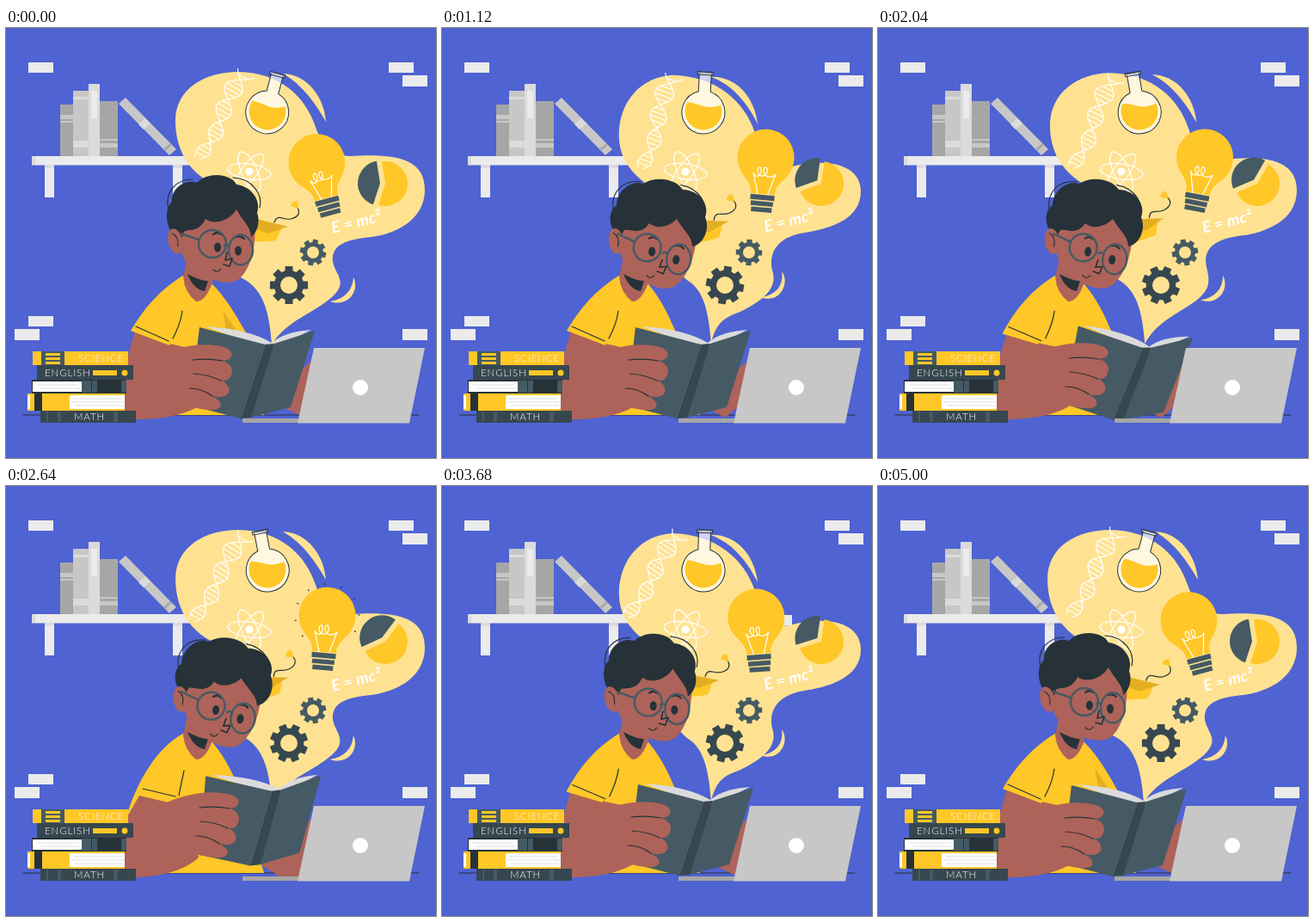
Recreate the animation shown at these times as an HTML page. Size 500x500 px, loop 5080 ms.

```html
<!DOCTYPE html>
<html lang="en">
<head>
<meta charset="utf-8">
<title>Reading and imagining</title>
<style>
html, body { margin: 0; width: 100%; height: 100%; overflow: hidden; background: #4f63d2; }
svg { display: block; width: 100%; height: 100%; }
.dark { fill: #263238; }
.slate { fill: #455a64; }
.deep { fill: #37474f; }
.yel { fill: #ffc727; }
.amber { fill: #e3ae22; }
.cream { fill: #ffe291; }
.skin { fill: #ad6359; }
.pale { fill: #ebebeb; }
.white { fill: #fff; }
.g1 { fill: #a6a6a6; }
.g2 { fill: #c7c7c7; }
.g3 { fill: #dbdbdb; }
.ink, .wire { fill: none; stroke: #263238; stroke-width: 1.2; stroke-linecap: round; stroke-linejoin: round; }
.wire { stroke: #fff; }
.bold { stroke-width: 2.2; }
.frame { fill: none; stroke: #455a64; stroke-width: 2.4; }
text { font: 300 11.5px Lato, sans-serif; letter-spacing: .9px; fill: #fff; }
#formula text { font: italic 700 18.5px Lato, sans-serif; letter-spacing: .2px; }
</style>
</head>
<body>
<svg viewBox="0 0 500 500">
  <defs><clipPath id="bowl"><circle r="21.5"/></clipPath></defs>
  <rect width="500" height="500" fill="#4f63d2"/>

  <path class="pale" d="M26,40h29v12h-29zM445,40h29v12h-29zM461,55h29v13h-29zM26,335h29v12h-29zM10,350h29v13h-29zM461,350h29v13h-29zM378,150h29v12h-29z"/>

  <g id="shelf">
    <path class="pale" d="M30,149h190v10.500h-190zM45,159h11v38h-11zM194,159h11v38h-11z"/>
    <path class="g3" d="M45,159h11v4h-11zM194,159h11v4h-11zM30,149h4v10h-4z"/>
    <path class="g1" d="M63,89h15v60h-15zM109,85h21v64h-21z"/>
    <path class="g2" d="M78,73h18v76h-18zM131,88l8,-7l59,60l-8,7zM63,101h15v5h-15zM63,108h15v2h-15zM109,129h21v2h-21zM109,134h21v5h-21z"/>
    <path class="g3" d="M96,65h13v84h-13zM78,80h18v3h-18zM78,131h18v8h-18zM154,112l8,-7l6,6l-8,7z"/>
    <path class="pale" d="M99,73h7v32h-7z"/>
    <path class="g1" d="M183,141l8,-7l2,2l-8,7z"/>
  </g>

  <g class="cream"><path id="blob"/><path id="arcTop"/><path id="arcLow"/></g>

  <path id="dna" class="wire"/>
  <g class="wire" transform="translate(283 167)">
    <ellipse rx="25" ry="9" transform="rotate(8)"/>
    <ellipse rx="25" ry="9" transform="rotate(66)"/>
    <ellipse rx="25" ry="9" transform="rotate(126)"/>
    <circle class="white" r="4"/>
  </g>

  <g transform="translate(304 97)">
    <g id="flask">
      <path d="M-7,-45H7V-23A25,25 0 1 1 -7,-23Z" fill="#fff" fill-opacity=".72" stroke="#263238" stroke-width="1"/>
      <path d="M-9,-46H9V-42.500H-9Z" fill="#fff" fill-opacity=".4" stroke="#263238" stroke-width="1"/>
    </g>
    <g clip-path="url(#bowl)"><path id="liquid" class="yel" d="M-30,-9C-20,-13 -10,-9 0,-6C10,-3 18,-8 30,-10V30H-30Z"/></g>
  </g>

  <g id="cap">
    <path class="yel" d="M282,232L320,234L314,247Q300,249 282,248Z"/>
    <path class="amber" d="M268,225L291,222L328,231L304,239Z"/>
    <path class="ink" d="M312,226C316,215 322,224 331,222C341,220 342,214 339,209"/>
    <path class="yel" d="M340,210L331,207Q332,201 339,201Z"/>
  </g>

  <path class="ink" id="rays"/>
  <g id="bulb">
    <path class="yel" d="M-14,-10C-14,-20 -19,-24 -25,-31A33,33 0 1 1 25,-31C19,-24 14,-20 14,-10Z"/>
    <path class="wire" d="M-6,-10L-13,-34M6,-10L13,-34M-13,-34C-9,-27 -4,-30 -4,-37C-4,-43 -9,-41 -8,-36C-7,-28 3,-30 3,-37C3,-43 -2,-42 -1,-36C0,-29 9,-29 13,-34"/>
    <path class="slate" d="M-14,-9H14V-3H-14ZM-13,-1.500H13V4H-13ZM-12,5.500H12V11H-12Z"/>
  </g>

  <path id="slice" class="slate"/><path id="pie" class="yel"/>
  <g id="formula"><text transform="rotate(-14)">E = mc²</text></g>
  <path id="gearA" class="deep" fill-rule="evenodd"/>
  <path id="gearB" class="slate" fill-rule="evenodd"/>

  <path class="ink" d="M20,450H480"/>

  <g id="body">
    <path id="torso" class="yel"/>
    <path id="crease" class="amber"/>
    <path class="skin" d="M212,262L240,285L240,296Q232,318 221,318Q208,308 206,290Z"/>
    <path class="dark" d="M211,286Q228,295 235,294L231,306Q218,304 211,286Z"/>
  </g>

  <path id="face" class="skin" d="M200,222C198,250 203,272 222,284C245,297 262,299 272,291C287,276 291,250 289,222L250,192Z"/>
  <path id="hair" class="dark"/>
  <g id="details">
    <ellipse class="skin" cx="197" cy="248" rx="8.500" ry="15" transform="rotate(-14 197 248)"/>
    <path class="ink" d="M193,239Q201,242 200,254M189,211C184,190 198,176 217,176M264,174C286,175 299,193 295,209"/>
    <g id="eyeL">
      <path class="ink bold" d="M241,240Q246,236 250,240"/>
      <ellipse class="dark" cx="246" cy="255" rx="4" ry="5.500"/>
      <circle class="frame" cx="240" cy="251" r="16"/>
      <path class="frame" d="M224,246L203,239"/>
    </g>
    <g id="eyeR">
      <path class="ink bold" d="M267,243Q273,241 277,245"/>
      <ellipse class="dark" cx="270" cy="259" rx="4" ry="5.500"/>
      <ellipse class="frame" cx="273" cy="258" rx="14" ry="17.500"/>
      <path class="frame" d="M253,254Q257,250 260,254"/>
    </g>
    <g id="mouth">
      <path class="ink" style="stroke-width:1.700" d="M257,261L255,270L263,268L260,277L253,275"/>
      <path class="ink" d="M241,281Q246,286 250,280"/>
    </g>
  </g>

  <path id="farArm" class="skin"/>
  <path id="upper" class="skin"/>
  <path id="sleeve" class="yel"/>
  <path id="folds" class="ink"/>

  <g id="book">
    <path class="g3" d="M232,347Q282,350 309,366Q324,353 355,351L313,372H300Z"/>
    <path class="slate" d="M225,348L301,368L273,454L214,439Z"/>
    <path class="slate" d="M312,367L359,352L331,441L284,453Z"/>
    <path class="deep" d="M300,368L312,367L285,453L272,454Z"/>
    <path d="M301,368L273,453" fill="none" stroke="#60737d" stroke-width=".8"/>
  </g>
  <g id="hand">
    <path class="skin" d="M170,384C205,367 235,366 253,371C267,375 265,386 252,387C263,390 266,400 260,407C257,411 252,410 249,409C261,414 262,424 256,427C250,431 240,428 236,427C250,431 253,440 246,443C236,447 218,440 207,440C190,450 165,450 150,452Z"/>
    <path class="ink" d="M217,386Q235,384 252,387M218,402Q236,403 250,410M213,419Q228,419 240,428"/>
  </g>

  <g id="laptop">
    <path class="g1" d="M275,454H350V459H275Z"/>
    <path class="g2" d="M358,372H487L469,459.500H339Z"/>
    <circle class="white" cx="412" cy="418" r="9"/>
  </g>

  <g id="stack">
    <path class="yel" d="M31,376H142V392H31ZM25,425H138V445H25Z"/>
    <path class="slate" d="M41,376H68V392H41Z"/>
    <path class="yel" d="M46,378H63V381H46ZM46,383H63V386H46ZM46,388H63V391H46Z"/>
    <path class="deep" d="M36,392H148V409H36ZM40,445H151V459H40Z"/>
    <path class="dark" d="M30,409H140V425H30ZM33,425H42V445H33Z"/>
    <path class="slate" d="M88,410H99V424H88ZM100,410H106V424H100ZM134,410H140V424H134ZM47,446H49V458H47ZM60,446H64V458H60ZM125,446H130V458H125Z"/>
    <path class="white" d="M31,411H88V423H31ZM74,427H138V443H74ZM25,427H28V443H25Z"/>
    <path d="M36,415H84M40,419H86M78,431H134M76,435H138M80,439H136" stroke="#d5d5d5" stroke-width=".8"/>
    <path class="yel" d="M101,398H129V404H101Z"/><circle class="yel" cx="138" cy="401" r="3.500"/>
    <text x="84" y="388">SCIENCE</text>
    <text x="45" y="405">ENGLISH</text>
    <text x="79" y="456">MATH</text>
  </g>
</svg>
<script>
const LOOP = 5080, TAU = Math.PI * 2;
const TIMES = [0, 1120, 2040, 2640, 3680, 4320];
const $ = id => document.getElementById(id);
const set = (id, d) => $(id).setAttribute('d', d);
const move = (id, v) => $(id).setAttribute('transform', v);
const rad = a => a * Math.PI / 180;
const lerp = (a, b, k) => a + (b - a) * k;

// Periodic curve through the key values, without overshoot.
function key(t, v) {
  const n = TIMES.length;
  const time = i => TIMES[(i + n) % n] + Math.floor(i / n) * LOOP;
  const val = i => v[(i + n) % n];
  const grad = i => (val(i + 1) - val(i)) / (time(i + 1) - time(i));
  const slope = i => {
    const a = grad(i - 1), b = grad(i);
    return a * b <= 0 ? 0 : 2 * a * b / (a + b);
  };
  let i = n - 1;
  while (TIMES[i] > t) i--;
  const h = time(i + 1) - time(i), s = (t - time(i)) / h, s2 = s * s, s3 = s2 * s;
  return val(i) * (2 * s3 - 3 * s2 + 1) + val(i + 1) * (3 * s2 - 2 * s3)
    + h * (slope(i) * (s3 - 2 * s2 + s) + slope(i + 1) * (s3 - s2));
}

// Blends two paths of the same structure.
function blend(a, b, k) {
  const to = b.match(/[\d.]+/g);
  let i = 0;
  return a.replace(/[\d.]+/g, n => lerp(+n, +to[i++], k).toFixed(2));
}

const SHAPES = {
  blob: [
    'M309,368C306,330 300,300 268,288C230,250 250,200 240,181C210,166 197,138 197,108C197,70 232,51 270,51C320,52 348,80 360,115C368,138 380,148 400,149C450,146 487,150 487,188C487,225 450,240 425,243C395,246 378,252 380,272C383,287 398,295 380,312C358,332 326,340 309,368Z',
    'M313,366C310,330 305,305 285,293C240,250 255,210 244,186C218,168 206,150 206,124C207,85 232,57 268,55C318,56 352,85 364,122C370,150 380,166 405,162C450,150 487,160 487,190C487,225 445,234 420,238C390,243 378,262 385,285C390,305 370,319 345,331C322,338 318,348 313,366Z'
  ],
  arcTop: ['M322,53C350,54 370,80 372,109C360,88 345,66 322,53Z', 'M312,57C342,56 363,80 367,112C355,88 338,66 312,57Z'],
  arcLow: ['M404,290C412,306 397,325 377,318C394,315 403,305 404,290Z', 'M395,283C405,297 392,321 371,313C388,310 397,300 395,283Z']
};
const HAIR = [
  'M197,243C186,232 183,212 193,202C192,185 210,175 222,180C236,166 262,170 268,182C285,184 297,200 292,215C296,226 292,238 285,243C285,231 274,223 268,211C258,226 241,229 232,222C224,239 211,233 207,237L204,246Z',
  'M204,241C194,231 192,214 203,206C203,190 220,176 234,181C249,171 273,176 280,188C298,188 312,205 306,220C312,234 304,252 291,254C291,242 280,235 273,222C264,232 248,234 241,227C231,242 219,233 212,235L208,242Z'
];
const TORSO = [
  'M206,288C190,296 180,315 180,350L185,450H300L280,356C272,342 258,316 240,298Z',
  'M206,288C190,296 180,315 180,350L185,450H300L273,356C265,338 257,318 240,298Z'
];
const CREASE = ['M252,328L270,355L256,351Z', 'M254,330L264,354L264,354Z'];
const SLEEVE = ['M206,288C180,303 160,326 145,352L190,369L208,325Z', 'M206,288C177,303 152,342 139,388L155,360L198,370L210,325Z'];
const FOLDS = ['M151,347L189,364M205,329Q203,344 194,361', 'M159,352L197,361M207,331Q204,344 201,360'];

function gear(x, y, r, hole, turn) {
  let d = '';
  for (let i = 0; i < 8; i++)
    for (const [f, q] of [[-.25, 1], [.25, 1], [.34, .77], [.66, .77]]) {
      const a = rad(turn) + (i + f) / 8 * TAU;
      d += (d ? 'L' : 'M') + (x + q * r * Math.cos(a)) + ',' + (y + q * r * Math.sin(a));
    }
  return d + `ZM${x - hole},${y}a${hole},${hole} 0 1 0 ${2 * hole},0a${hole},${hole} 0 1 0 ${-2 * hole},0Z`;
}

function sector(x, y, r, a, b) {
  const p = q => (x + r * Math.cos(rad(q))) + ',' + (y + r * Math.sin(rad(q)));
  return `M${x},${y}L${p(a)}A${r},${r} 0 ${b - a > 180 ? 1 : 0} 1 ${p(b)}Z`;
}

function helix(x0, y0, x1, y1) {
  const len = Math.hypot(x1 - x0, y1 - y0), nx = -(y1 - y0) / len, ny = (x1 - x0) / len;
  const at = (s, side) => {
    const off = side * lerp(7, 12, s) * Math.sin(s * TAU * 2.1 + .5) + 4 * Math.sin(s * TAU);
    return (lerp(x0, x1, s) + nx * off).toFixed(1) + ',' + (lerp(y0, y1, s) + ny * off).toFixed(1);
  };
  let d = '';
  for (const side of [-1, 1])
    for (let i = 0; i <= 50; i++) d += (i ? 'L' : 'M') + at(i / 50, side);
  for (let i = 1; i < 22; i++) d += 'M' + at(i / 22, -1) + 'L' + at(i / 22, 1);
  return d;
}

function rays(x, y, tilt, p) {
  if (p <= 0 || p >= 1) return '';
  const from = 36 + 9 * p, to = from + 9 * Math.sin(Math.PI * p);
  let d = '';
  for (let i = 0; i < 9; i++) {
    const a = rad(136 + i * 31 + tilt), c = Math.cos(a), s = Math.sin(a);
    d += `M${x + from * c},${y + from * s}L${x + to * c},${y + to * s}`;
  }
  return d;
}

function draw(now) {
  const t = now % LOOP, k = (...v) => key(t, v);
  const narrow = (1 - Math.cos(2 * TAU * t / LOOP)) / 2;
  const swing = (1 - Math.cos(TAU * t / LOOP)) / 2;

  for (const id in SHAPES) set(id, blend(...SHAPES[id], narrow));
  set('dna', helix(k(223, 231, 225, 216, 214, 219), k(151, 163, 162, 156, 151, 150),
    k(279, 270, 277, 279, 277, 279), k(53, 56, 58, 58, 56, 53)));

  const tip = k(15, 3, -10, -11, 2, 12);
  move('flask', `rotate(${tip})`);
  move('liquid', `rotate(${tip * .4})`);
  move('cap', `translate(${k(0, 4, 3, -1, -6, -3)} ${k(0, -5, -8, -7, -5, -2)}) rotate(${k(0, -12, -16, -14, -3, 0)} 322 226)`);

  const tilt = k(-15, 5, 11, 5, -4, -12);
  const bx = k(375, 372, 370, 369, 369, 373), by = k(207, 203, 202, 203, 205, 206);
  move('bulb', `translate(${bx} ${by}) rotate(${tilt})`);
  const p = t < 3500 ? (t - 2600) / 900 : (t - 3960) / 800;
  set('rays', rays(bx + 52 * Math.sin(rad(tilt)), by - 52 * Math.cos(rad(tilt)), tilt, p));

  const a = k(108, 160, 157, 155, 163, 112), b = k(261, 278, 300, 307, 278, 263), m = rad((a + b) / 2);
  set('pie', sector(441, 181, 26, b, a + 360));
  set('slice', sector(441 + 6 * Math.cos(m), 181 + 6 * Math.sin(m), 26, a, b));

  move('formula', `translate(${380 - 4 * narrow} ${239 - 1.5 * narrow})`);
  set('gearA', gear(329, 299, 22.5, 10, 24 * swing));
  set('gearB', gear(357, 261, 15.5, 7, 12 - 24 * swing));

  const nod = k(0, 1, 1, 1.12, .13, 0);
  const pose = `translate(${4 * nod} ${7 * nod}) rotate(${7 * nod} 256 255)`;
  move('face', pose);
  move('details', pose);
  move('eyeL', `translate(${-6 * nod} 0)`);
  move('eyeR', `translate(${-nod} ${2 * nod})`);
  move('mouth', `translate(${-4 * nod} ${2 * nod})`);
  set('hair', blend(...HAIR, nod));

  const settle = k(0, 1, 1, 1, 1, 1);
  set('torso', blend(...TORSO, settle));
  set('crease', blend(...CREASE, settle));

  move('book', `translate(${k(0, 0, 4, 9, 3, 0)} ${k(0, 0, 3, -13, -1, 0)}) rotate(${k(0, 0, 4, -2, 0, 0)} 290 400)`);
  move('hand', `translate(${k(0, 0, 5, 8, 3, 0)} ${k(0, 0, -2, -12, -1, 0)})`);
  const lift = k(0, 0, .1, 1, .1, 0);
  set('sleeve', blend(...SLEEVE, lift));
  set('folds', blend(...FOLDS, lift));
  set('upper', blend('M150,352L190,367L212,372L222,441C200,453 170,456 138,455L138,395Z',
    'M155,358L198,369L214,370L224,432C205,450 170,456 138,455L138,390Z', lift));
  set('farArm', blend('M356,386L330,410L326,443L346,452L360,400Z', 'M355,388L325,410L296,440L318,454L348,454Z', k(0, .6, .6, 1, .2, .1)));
}

function tick() {
  draw(performance.now());
  requestAnimationFrame(tick);
}
tick();
</script>
</body>
</html>
```
